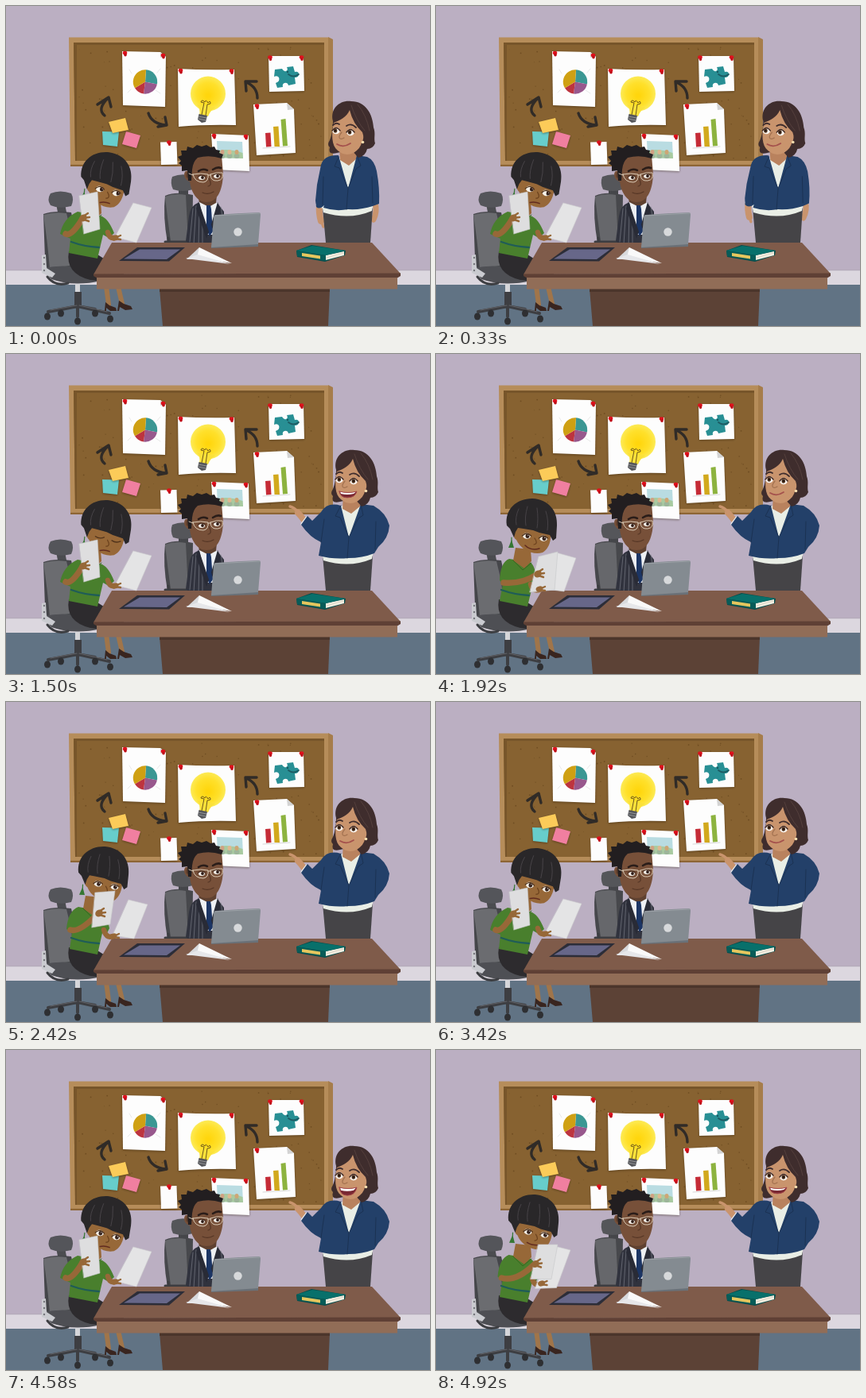
Animation of 533x403 px, one loop 5010 ms. Source, as an HTML page with a canvas:

```html
<!DOCTYPE html>
<html lang="en">
<head>
<meta charset="utf-8">
<title>Team meeting</title>
<style>
html, body { margin: 0; width: 100%; height: 100%; overflow: hidden; background: #bbafc2; }
canvas { display: block; width: 533px; height: 403px; }
</style>
</head>
<body>
<canvas id="stage" width="533" height="403"></canvas>
<script>
const LOOP = 5010, FRAMES = 60;
const screen = document.getElementById('stage').getContext('2d');
let ctx = screen;

const fill = (color, d) => { ctx.fillStyle = color; ctx.fill(new Path2D(d)); };
const line = (color, width, d) => {
  ctx.strokeStyle = color; ctx.lineWidth = width;
  ctx.lineCap = ctx.lineJoin = 'round';
  ctx.stroke(new Path2D(d));
};
const oval = (color, x, y, rx, ry = rx, turn = 0) => {
  ctx.fillStyle = color; ctx.beginPath();
  ctx.ellipse(x, y, rx, ry, turn, 0, 7); ctx.fill();
};
const sheet = (d, color = '#fdfdfd') => {
  ctx.save();
  ctx.shadowColor = 'rgba(40,25,5,.45)'; ctx.shadowBlur = 3; ctx.shadowOffsetY = 1;
  fill(color, d);
  ctx.restore();
};
const pin = (x, y) => { oval('#e0101c', x, y, 2.8, 2.3); oval('#c00d18', x + .5, y + 2.5, 1.8, 2); };
const shifted = (x, y, turn, draw) => {
  ctx.save(); ctx.translate(x, y); ctx.rotate(turn); draw(); ctx.restore();
};

// Blend two path strings that share the same commands.
const blend = (a, b, k) => {
  const to = b.match(/-?[\d.]+/g);
  let i = 0;
  return a.replace(/-?[\d.]+/g, n => (+n + (to[i++] - n) * k).toFixed(2));
};
const ramp = (v, a, b) => {
  const k = Math.min(1, Math.max(0, (v - a) / (b - a)));
  return k * k * (3 - 2 * k);
};

function room() {
  fill('#bbafc2', 'M0 0H533V403H0Z');
  fill('#dcd7df', 'M0 333H533V351H0Z');
  fill('#b4abba', 'M0 332H533V333.2H0Z');
  fill('#617384', 'M0 351H533V403H0Z');
}

function corkBoard() {
  fill('#a67d4b', 'M405 39L411 42V202L405 201Z');
  fill('#b68d5a', 'M79 39.5H405V201H81Z');
  fill('#8d6536', 'M81 199.8H409V202H81Z');
  fill('#876231', 'M85 46H400V195H87Z');
  fill('#77552a', 'M85 46H400V49H89V195H87Z');
  let seed = 11;
  const rnd = () => (seed = seed * 16807 % 2147483647) / 2147483647;
  for (let i = 0; i < 110; i++) oval('rgba(82,53,18,.45)', 92 + rnd() * 304, 52 + rnd() * 140, .4 + rnd() * .6);
}

function pieSheet() {
  sheet('M146 57L194 58L201 64L200 127L147 125Z');
  fill('#d4d4d4', 'M194 58V65L201 64Z');
  [['#3b9793', -1.5, .2], ['#98588d', .2, 1.7], ['#bd343f', 1.7, 2.6], ['#cfa013', 2.6, 4.78]].forEach(([color, a, b]) => {
    ctx.fillStyle = color; ctx.beginPath(); ctx.moveTo(175, 95.5);
    ctx.arc(175, 95.5, 15.2, a, b); ctx.fill();
  });
  line('#e0e0e0', .7, 'M158 85L155 80M190 84L194 79M157 105L153 109M188 106L194 110');
  pin(149.5, 59); pin(197.5, 62);
}

function bulbSheet() {
  sheet('M216 79Q250 81 287 80L289 150Q250 149 217 152Z');
  const glow = ctx.createRadialGradient(254, 113, 2, 254, 110, 23);
  glow.addColorStop(0, '#ffd60d'); glow.addColorStop(.6, '#ffe02b'); glow.addColorStop(1, '#fcec5d');
  oval(glow, 254, 110.5, 22, 22);
  fill('#fbe13a', 'M240 124Q245 130 243 137L254 139Q257 131 263 128Z');
  line('#6a551b', 1, 'M246 137L249 122L245 121Q246 117 250 121Q251 117 254 122Q257 118 257 123L253 124L251 138');
  fill('#55565a', 'M242.5 136L253 138L251 146L246 147L241 143Z');
  line('#a4a5a8', .8, 'M242 139L252 141M242 142L251 144');
  pin(219.5, 81); pin(283.5, 81.5);
}

function puzzleSheet() {
  sheet('M330 63L374 63L375 107L331 108Z');
  fill('#288f94', 'M338 80L347 79Q349 83 352 82Q355 81 353 77L361 76L363 83Q368 82 368 86Q368 90 363 90L364 98L355 100Q354 96 350 97Q347 98 348 102L341 103L339 97Q345 95 343 90Q341 87 337 89Z');
  line('#1c5b63', 1.8, 'M355 86Q361 91 368 86');
  oval('#1c5b63', 354, 83, 1.2);
  pin(332, 64.5); pin(371.5, 64.5);
}

function chartSheet() {
  sheet('M311 124L353 122L362 130L364 185L315 188Z');
  fill('#d3d3d3', 'M353 122L354 131L362 130Z');
  fill('#c52b36', 'M326 160L332.5 159.5L333.5 177L327 177.5Z');
  fill('#d2a91d', 'M336 152L342.5 151.5L344 177L337.5 177Z');
  fill('#8db33f', 'M345.5 143L351.5 142L354 176L348 176.5Z');
  line('#c9c9c9', .7, 'M323 179L357 177');
  pin(315.5, 125.5);
}

function photoSheet() {
  sheet('M258 161L305 163L306 208L261 206Z');
  fill('#b9dce2', 'M265 170L297 171L298 192L266 191Z');
  fill('#a9cba0', 'M265.5 183Q276 178 297.5 185L298 192L266 191Z');
  [[272, '#d0a183'], [281, '#e0b890'], [290, '#cda676']].forEach(([x, tone]) => {
    oval('#9db59a', x, 189, 3.5, 3); oval(tone, x, 184, 2.5, 3);
  });
  pin(261.5, 163); pin(301.5, 164);
}

function boardItems() {
  pieSheet(); bulbSheet(); puzzleSheet(); chartSheet(); photoSheet();
  sheet('M194 171.5L214.5 171L215.5 199.5L195 200Z'); pin(205, 171.5);
  sheet('M121 158L142 158.5L140 177L122 175Z', '#67cdcb');
  sheet('M151 158L169 163L164 179L146 174Z', '#f07fa0');
  sheet('M129 146L150 141L154 156L134 160Z', '#fccb59');
  const ink = '#302b27';
  line(ink, 3.4, 'M124 138Q114 130 128 116M115 124L129 115L132 127');
  line(ink, 3.4, 'M179 135Q183 148 201 150M200 140L202 150L191 152');
  line(ink, 3.4, 'M316 116Q316 102 302 96M302 107L301 95L315 95');
}

function leftChair() {
  const dark = '#3d3e42';
  fill('#4b4c50', 'M63 249H74L77 265H66Z');
  fill('#54555a', 'M56 236Q68 231 82 236Q86 243 82 252Q67 256 56 251Q51 244 56 236Z');
  fill('#45464a', 'M47 262Q60 257 82 260L96 326L60 336Q48 331 49 318Z');
  fill('#6b6c70', 'M47 263Q60 259 76 261Q84 290 86 326L55 331Q52 295 47 263Z');
  fill('#4e4f54', 'M47 330Q80 323 116 335L120 346Q85 354 57 344Z');
  fill('#cacbd0', 'M45 314L50 313L51 330L62 337L58 342L45 336Z');
  [317, 325, 333].forEach(y => oval('#74757a', 48, y, 1.2));
  line(dark, 3, 'M52 341Q62 354 78 349');
  fill('#d5d6da', 'M87 350H93V362H87Z');
  fill(dark, 'M86 360H95V380H86Z');
  line(dark, 4, 'M90 378L53 385M90 378L130 387M90 378L70 382M90 378L112 382M90 377V391');
  line('#606166', 1.1, 'M89 377L56 383M92 377L127 385');
  [[52, 391], [69, 387], [90, 397], [112, 387], [131, 394]].forEach(([x, y]) => oval('#2e2f32', x, y, 4, 4.6));
}

function man() {
  fill('#45464a', 'M217 230H229V245H217Z');
  fill('#55565a', 'M209 215Q221 210 233 214L235 231Q222 235 210 231Q206 223 209 215Z');
  fill('#47484c', 'M200 239Q214 233 235 238L234 300L203 298Q197 265 200 239Z');
  fill('#66676b', 'M200 240Q212 235 226 238L229 298L207 296Q203 268 200 240Z');
  line('#3c3d41', 3, 'M204 292V300M200 297H231');

  fill('#31333e', 'M241 248Q232 251 230 265L226 296L236 303H274V259L267 250Z');
  line('#777a85', .7, 'M235 255L231 297M239 252L236 300M243 257L242 302M247 266L247 302M270 253L272 264');
  fill('#eef0f3', 'M243 247L253 288L260 288L267 248Z');
  fill('#5f4130', 'M240 235L265 238L264 248L255 253L243 247Z');
  fill('#1c3564', 'M252 251L257 251L258 256L260 284L256 290L252 282Z');
  fill('#292b36', 'M242 246L239 255L252 293L255 284Z');
  fill('#292b36', 'M266 247L270 256L261 286L258 275Z');
  fill('#775039', 'M230 208C222 205 222 219 231 221C233 236 241 247 252 247C265 247 272 234 273 212L271 188L234 187Z');
  oval('#60402d', 228, 213, 1.8, 3.6);
  fill('#221e20', 'M229 220L228 207L221 208L221 201L217 198L220 195L216 190L221 188L220 182L227 182L228 177L235 179L240 175L246 177L252 175L257 178L262 177L264 181L269 182L268 185L273 187L271 192Q256 187 241 191Q235 196 234 206L233 220Z');
  line('#2a1d19', 2.6, 'M242 208Q247 204 253 207M260 206Q266 202 270 204');
  [[246, 216], [265, 214]].forEach(([x, y]) => {
    oval('#f2eee8', x, y, 4, 3); oval('#2d1b16', x + 1, y, 1.9);
    line('#4e3122', 1.5, `M${x - 4.5} ${y - 1}Q${x} ${y - 5} ${x + 4.5} ${y - 1}`);
  });
  line('#d9c9b4', 1, 'M235 212Q245 210 254 212Q255 221 248 222Q237 222 235 212ZM257 212Q265 209 272 210Q274 219 266 220Q257 221 257 212M254 213L257 213M235 213L230 211');
  line('#553625', 1.2, 'M255 217Q260 226 254 227M247 235Q254 238 261 234');
}

function table() {
  fill('#5c4236', 'M193 356H407L405 403H197Z');
  fill('#4b352b', 'M193 356H407V360H193Z');
  fill('#7f5b4a', 'M133 298H460L496 337L110 338Z');
  fill('#5f4035', 'M110 337.5L496 336.5V340L491 343H115L110 340Z');
  fill('#916d57', 'M114 342H492V356.5H114Z');

  fill('#2c2d38', 'M165 304H225L205 321.5L142 321Z');
  fill('#676789', 'M168 306.5H219L202 319L148 318.5Z');
  fill('#d8dadd', 'M243 304L246 319L227 319Z');
  fill('#f9f9f9', 'M243 304L284 324L240 317Z');
  fill('#e6e7ea', 'M226 318L241 313L282 325L250 321Z');

  fill('#6a7178', 'M258 301L317 299V303L258 305Z');
  fill('#848b91', 'M264 263Q290 261 318 260Q320 260 320 263L317 300L258 304L261 266Q261 263 264 263Z');
  line('#a3a8ad', .8, 'M263 264L319 261');
  oval('#d7d9db', 291.5, 284.5, 5.2);

  fill('#064c4b', 'M365 308L384 301L427 308L426 314L401 322L366 316Z');
  fill('#f3eee1', 'M402 314L425 309V314L402 320Z');
  line('#c9c1ae', .6, 'M403 317L424 311');
  fill('#08706b', 'M365 308L385 302L427 308L402 314Z');
  fill('#075c58', 'M365 308L402 314V321L366 315Z');
  fill('#e5c65e', 'M372 311L395 314.5V318.5L372 315Z');
}

// Seated woman: torso, sheets, arms, hands, then head "x y turn smile".
const poses = {
  hide: {
    torso: 'M90 259Q72 267 68 287L81 293L79 311L115 318L122 288L129 292L136 286Q128 266 118 264Z',
    near: 'M92 239L115 234L118 281L98 287Z', far: 'M160 248L183 254L164 298L137 291Z',
    armL: 'M75 287Q82 291 96 268', armR: 'M128 285Q130 293 136 292',
    hands: '97 267 137 292', head: '5 2 0.1 0'
  },
  rise: {
    torso: 'M91 258Q78 263 76 286L83 291L80 311L115 318L121 291L126 293L130 285Q126 266 118 263Z',
    near: 'M112 240L137 238L131 280L108 284Z', far: 'M154 249L178 255L161 298L134 294Z',
    armL: 'M81 287Q92 291 115 267', armR: 'M123 287Q126 298 134 295',
    hands: '117 266 135 295', head: '2 0 0.035 0.3'
  },
  swap: {
    torso: 'M92 258Q81 262 79 285L84 290L80 311L115 318L121 292L124 293L128 285Q125 266 118 262Z',
    near: 'M145 250L169 252L159 297L130 293Z', far: 'M137 243L160 249L142 301L115 307Z',
    armL: 'M84 287Q108 294 131 274', armR: 'M119 289Q121 298 130 294',
    hands: '133 273 130 293', head: '2 0 0.035 1'
  },
  read: {
    torso: 'M92 258Q81 262 80 285L84 290L80 311L115 318L121 293L123 293L126 285Q125 266 118 262Z',
    near: 'M129 255L153 249L149 297L118 300Z', far: 'M151 250L176 257L161 299L138 296Z',
    armL: 'M85 288Q108 290 126 278', armR: 'M119 290Q121 299 130 297',
    hands: '128 277 130 296', head: '0 0 0 1'
  }
};
const seatedKeys = [[0, 'hide'], [18, 'hide'], [20, 'rise'], [22, 'swap'], [23, 'read'], [27, 'read'],
  [29, 'rise'], [33, 'hide'], [54, 'hide'], [57, 'rise'], [59, 'swap'], [60, 'swap']];

function seatedPose(f) {
  const i = seatedKeys.findIndex(([at]) => at > f);
  const [from, a] = seatedKeys[i - 1], [to, b] = seatedKeys[i];
  const k = (f - from) / (to - from), pose = {};
  for (const part in poses[a]) pose[part] = blend(poses[a][part], poses[b][part], k);
  return pose;
}

const skinDark = '#976838';

function seatedBody(pose) {
  line('#a0754a', 6, 'M125 345L129 376M139 345L146 375');
  fill('#39251f', 'M125 373L130 377L138 380L139 384L131 384L126 380V384H124Z');
  fill('#39251f', 'M142 371L148 375L157 378L159 382L150 383L143 379L142 384H140Z');
  fill('#2d2b2e', 'M79 309Q98 314 115 313L148 334V350L106 345Q74 337 79 309Z');
  fill('#497f2d', pose.torso);
  line('#1f5c58', 2.4, 'M82 297Q98 303 117 304');
  fill(skinDark, 'M100 244L119 246L120 261L111 270L97 260Z');
  line('#37651f', 1, 'M97 260L109 272L120 263');
}

function seatedHead(pose, f) {
  const [x, y, turn, smile] = pose.head.split(' ').map(Number);
  shifted(120 + x, 218 + y, turn, () => {
    ctx.translate(-120, -218);
    line('#357733', 1.2, 'M95 231V236');
    fill('#357733', 'M95 234L98 244L91 244Z');
    fill(skinDark, 'M98 212L143 214C147 231 143 245 134 250C122 254 106 246 101 234Q95 231 98 212Z');
    const blink = f === 18 || f === 39;
    const look = f > 48 && f < 52 ? [0, 1.2] : f < 6 ? [1.5, .2] : [0, .3];
    [[114, 229], [135, 232]].forEach(([ex, ey]) => {
      if (!blink) {
        oval('#f5f1e9', ex, ey, 5, 3.8, .12);
        oval('#35221c', ex + 1 + look[0], ey + look[1], 2.4, 2.7);
        oval('#fff', ex + 1.8 + look[0], ey - .8, .6);
      }
      line('#51331b', 1.4, `M${ex - 5.5} ${ey}Q${ex} ${ey + (blink ? 3 : -6)} ${ex + 5.5} ${ey}`);
    });
    line('#6c421e', 1.2, 'M124 232Q129 239 123 240');
    line('#612b20', 1.5, blend('M116 246Q122 244 128 246', 'M112 241Q119 248 130 245', smile));
    fill('#292729', 'M89 216C86 196 101 182 121 182C142 183 153 198 152 216L151 232L147 235L143 228L130 225L122 222L110 220L103 219L100 224L98 231L93 220Z');
    line('#4a464a', .9, 'M104 195Q99 206 101 215M115 192Q111 206 113 216M127 194Q129 208 127 219M138 198Q142 210 140 222');
  });
}

function seatedHands(pose) {
  const [lx, ly, rx, ry] = pose.hands.split(' ').map(Number);
  line(skinDark, 6.5, pose.armR);
  fill('#e4e4e5', pose.far); line('#cbcccd', .6, pose.far);
  line(skinDark, 7.5, pose.armL);
  fill('#dededf', pose.near); line('#c6c8ca', .6, pose.near);
  oval(skinDark, lx, ly, 5, 4.2, -.6);
  line(skinDark, 2.4, `M${lx} ${ly - 2}l6 -4M${lx + 1} ${ly}l7 -1M${lx + 1} ${ly + 2}l6 2`);
  oval(skinDark, rx, ry, 4.5, 3.5, -.3);
  line(skinDark, 2.4, `M${rx} ${ry}l7 -3M${rx} ${ry + 1}l7 1`);
}

const skinLight = '#c9946d', hairBrown = '#3f2d2d';

function speaker(f) {
  const k = ramp(f, 3, 9);
  const talking = (f > 7 && f < 21) || f > 42;
  const open = talking ? .5 + .5 * Math.cos((f - 10) * Math.PI * 9 / 20) : 0;
  const blink = [16, 32, 38, 49, 50].includes(f);
  line(skinLight, 7, blend('M464 248Q467 259 462 269', 'M468 225Q466 236 460 242', k));
  line(skinLight, 8, blend('M394 250Q393 261 396 271', 'M376 211Q371 204 367 200', k));
  line(skinLight, 3.4, blend('M396 266Q397 274 399 278', 'M367 199Q362 193 357 192', k));
  fill('#454447', 'M398 254H461L458 298H402Z');
  fill('#e9eee6', 'M397 250L462 248L460 258Q432 270 399 260Z');
  fill('#e9eee6', 'M416 192L447 189L442 212L430 236Z');
  fill('#b9825e', blend('M419 177L442 177L442 191L431 201L420 194Z', 'M424 177L446 177L446 191L434 201L423 195Z', k));
  line('#e9ebee', 3, blend('M391 250L397 253', 'M372 214L378 206', k));
  const jacket = blend(
    'M418 188Q400 187 396 200L391 225L389 245L390 253Q394 257 400 251L399 254Q414 259 430 256Q446 257 461 252L469 249Q470 230 466 208Q463 194 454 190L441 188L430 230Z',
    'M421 191Q404 186 396 199L385 210L379 204L371 215Q382 231 396 237L393 254Q412 259 430 257Q448 257 463 251L468 243Q481 232 482 216Q478 200 462 191L446 189L431 231Z', k);
  fill('#234069', jacket);
  line('#1b3253', 1, blend('M399 215L398 250M460 215L461 248M418 190L413 202L419 204L430 230L428 256M441 188L446 201L440 205L430 230',
    'M400 208L396 237M465 211L464 246M421 191L414 204L420 206L431 231L429 257M446 189L449 203L443 207L431 231', k));
  shifted(-4 + 4 * k, -1 + k, 0, () => speakerHead(open, blink, k));
}

function speakerHead(open, blink, k) {
  fill(hairBrown, 'M415 146C411 130 424 119 438 121C456 121 465 137 466 154C469 162 466 167 468 174Q465 181 458 181Q456 190 447 192L438 182L420 186Q408 189 411 179Q407 176 411 170Q415 160 415 146Z');
  fill(skinLight, 'M416 148C413 162 413 177 421 183Q430 191 441 186Q450 180 451 173Q455 168 452 160Q440 149 436 132C432 141 424 145 416 148Z');
  line('#57423f', .9, 'M438 126Q444 145 455 158M446 125Q457 138 461 158');
  oval('#f7dfb0', 452.5, 172.5, 1.8);
  [[419, 158], [437, 160]].forEach(([x, y]) => {
    if (!blink) {
      oval('#faf6f1', x, y, 4.8, 4.3);
      const gaze = x - 1 + .8 * k;
      oval('#54351f', gaze, y, 2.3, 2.7); oval('#1d1412', gaze, y, 1.2);
    }
    line('#41271f', 1.5, `M${x - 5} ${y}Q${x} ${y + (blink ? 3 : -7)} ${x + 5} ${y}`);
  });
  line(hairBrown, 1.8, 'M415 151Q419 147 423 150M432 152Q438 148 444 154');
  line('#a1704f', 1.2, 'M426 160Q421 166 424 168Q426 169 429 167');
  if (open > .12) {
    const drop = 175 + 9 * open;
    const mouth = `M419 173Q430 176 441 173Q439 ${drop} 429 ${drop}Q420 ${drop} 419 173Z`;
    fill('#792832', mouth);
    fill('#fff', `M420 173.5Q430 176 440 173.5L437 ${174 + 3 * open}Q429 ${176 + 3 * open} 421 ${174 + 3 * open}Z`);
    line('#a8474a', .9, mouth);
  } else {
    line('#a4504c', 1.7, 'M420 175Q428 180 437 174');
  }
}

function cached(draw) {
  const layer = document.createElement('canvas');
  layer.width = 533; layer.height = 403;
  ctx = layer.getContext('2d'); draw(); ctx = screen;
  return layer;
}
const backdrop = cached(() => { room(); corkBoard(); boardItems(); leftChair(); man(); });
const desk = cached(table);

function render(now) {
  const f = Math.floor(((now % LOOP) + 5) / LOOP * FRAMES) % FRAMES;
  const pose = seatedPose(f);
  ctx.drawImage(backdrop, 0, 0);
  seatedBody(pose);
  seatedHead(pose, f);
  speaker(f);
  ctx.drawImage(desk, 0, 0);
  seatedHands(pose);
}
const start = performance.now();
function tick() {
  render(performance.now() - start);
  requestAnimationFrame(tick);
}
tick();
</script>
</body>
</html>
```
